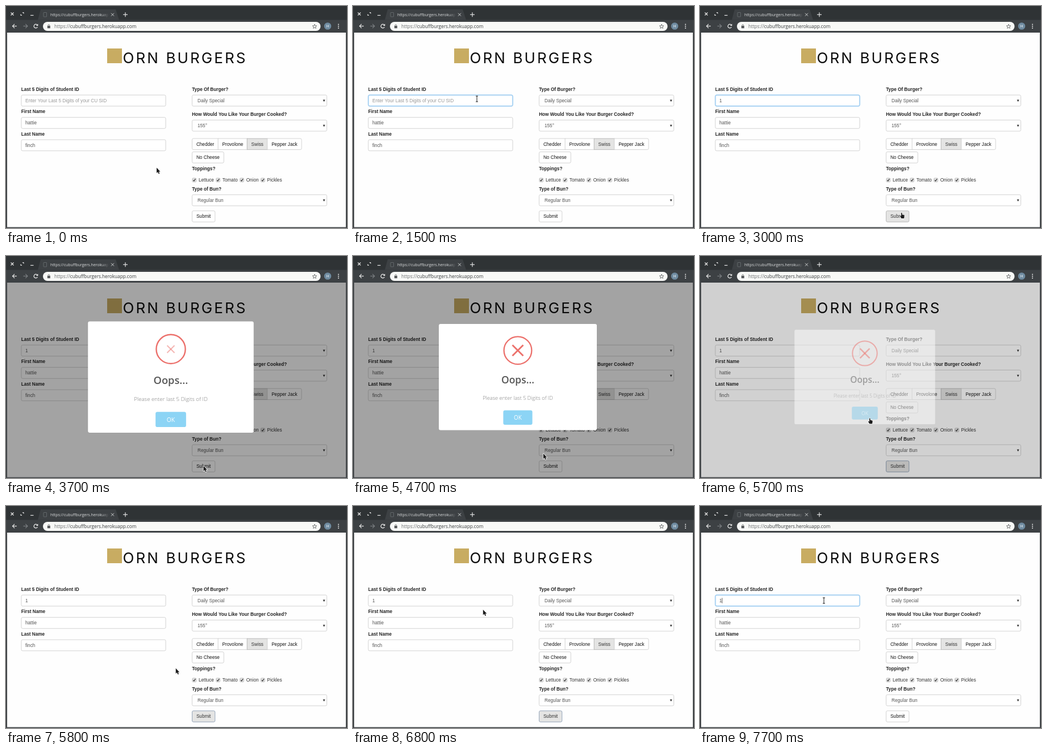
Recreate the animation shown at these times as an HTML page with a canvas. Size 600 px wide and 392 px high, loop 8000 ms.

```html
<!DOCTYPE html>
<html lang="en">
<head>
<meta charset="utf-8">
<title>Burger order form</title>
<style>
html, body { margin: 0; width: 100%; height: 100%; overflow: hidden; background: #fff; }
canvas { display: block; width: 600px; height: 392px; }
</style>
</head>
<body>
<canvas id="stage"></canvas>
<script>
const LOOP = 8000, STEP = 100, W = 600, H = 392;
const SANS = '"Liberation Sans", Arial, sans-serif';
const OPEN = '"Open Sans", "Noto Sans", sans-serif';
const BODY = '8.2px ' + SANS, BOLD = 'bold ' + BODY;
const URL_TEXT = 'https://cubuffburgers.herokuapp.com';
const LEFT = 27, RIGHT = 327.5, TOP = 157.2, ROW = 39.45, BOX_H = 19.6;
const OPENS = 3400, CLOSES = 5500;

const canvas = document.getElementById('stage');
const dpr = window.devicePixelRatio || 1;
canvas.width = W * dpr;
canvas.height = H * dpr;
const c = canvas.getContext('2d');

const ramp = (t, a, b) => Math.min(1, Math.max(0, (t - a) / (b - a)));
const within = (t, a, b) => t >= a && t < b;
const inside = (p, x, y, w, h) => p.x >= x && p.x <= x + w && p.y >= y && p.y <= y + h;
// Damped swing around 1.
const spring = k => 1 - 0.5 * Math.exp(-0.7 * k) * Math.cos(0.83 * k);

function text(str, x, y, font, color, align = 'left') {
  c.font = font;
  c.fillStyle = color;
  c.textAlign = align;
  c.fillText(str, x, y);
  return c.measureText(str).width;
}

function box(x, y, w, h, r, fill, stroke, line = 0.8) {
  c.beginPath();
  c.roundRect(x, y, w, h, r);
  if (fill) { c.fillStyle = fill; c.fill(); }
  if (stroke) { c.strokeStyle = stroke; c.lineWidth = line; c.stroke(); }
}

function line(color, width, ...pts) {
  c.strokeStyle = color;
  c.lineWidth = width;
  c.beginPath();
  for (let i = 0; i < pts.length; i += 2) c.lineTo(pts[i], pts[i + 1]);
  c.stroke();
}

function shape(color, ...pts) {
  c.fillStyle = color;
  c.beginPath();
  for (let i = 0; i < pts.length; i += 2) c.lineTo(pts[i], pts[i + 1]);
  c.fill();
}

function arc(x, y, r, color, width, from = 0, to = 7) {
  c.beginPath();
  c.arc(x, y, r, from, to);
  c.strokeStyle = c.fillStyle = color;
  c.lineWidth = width;
  width ? c.stroke() : c.fill();
}

function cross(x, y, r, color, width) {
  line(color, width, x - r, y - r, x + r, y + r);
  line(color, width, x + r, y - r, x - r, y + r);
}

function arrowIcon(x, dir, color) {
  const y = 35.5, tip = x + 3.7 * dir, back = tip - 3.6 * dir;
  line(color, 1.2, x - 3.7 * dir, y, tip, y);
  line(color, 1.2, back, y - 3.6, tip, y, back, y + 3.6);
}

function drawTabs() {
  const ink = '#e4e4e4';
  c.fillStyle = '#2f3335';
  c.fillRect(0, 0, W, 24.5);
  shape('#3d4144', 56, 24.5, 61, 6, 193, 6, 199, 24.5);

  cross(11, 14, 2.5, ink, 1.2);
  for (const d of [-1, 1]) shape(ink, 28.5 + 3 * d, 14 - 3 * d, 28.5 + 3 * d, 14, 28.5, 14 - 3 * d);
  line(ink, 1.2, 43, 16.5, 48.5, 16.5);
  box(66, 11.5, 5.5, 7.5, 0.5, null, '#6d7174');
  cross(187.5, 15.2, 2.5, '#cfd1d2', 1);
  line(ink, 1.2, 206, 15.2, 214, 15.2);
  line(ink, 1.2, 210, 11.2, 210, 19.2);

  const fade = c.createLinearGradient(168, 0, 181, 0);
  fade.addColorStop(0, '#dadcdd');
  fade.addColorStop(1, '#dadcdd00');
  text(URL_TEXT, 78, 17.8, '6.95px ' + OPEN, fade);
}

function drawToolbar() {
  const ink = '#e8e8e8', dark = '#55585a';
  arrowIcon(15.2, -1, ink);
  arrowIcon(34.2, 1, '#7b7f82');
  arc(52.5, 35.5, 3.3, ink, 1.2, 0.5, 5.6);
  shape(ink, 56.4, 31.5, 56.4, 35, 52.9, 35);

  box(65, 28, 488.5, 16, 8, '#f8f9f7');
  box(72.8, 35, 5, 4.2, 0.3, dark);
  arc(75.3, 34.6, 1.6, dark, 0.9, Math.PI, 0);
  const schemeWidth = text('https://', 85, 38.8, '8.18px ' + OPEN, '#6c6f71');
  text(URL_TEXT.slice(8), 85 + schemeWidth, 38.8, '8.18px ' + OPEN, '#3a3d3f');

  const star = [];
  for (let i = 0; i <= 10; i++) {
    const a = -Math.PI / 2 + i * Math.PI / 5, r = i % 2 ? 1.7 : 4;
    star.push(543 + r * Math.cos(a), 36.2 + r * Math.sin(a));
  }
  line(dark, 0.8, ...star);
  arc(566, 35.5, 6.3, '#6f8ba0');
  text('H', 566, 38.1, '7px ' + OPEN, '#fff', 'center');
  for (let i = -1; i <= 1; i++) arc(585, 35.7 + 3.2 * i, 1, ink);
}

const label = (str, x, boxY) => text(str, x - 0.3, boxY - 7.4, BOLD, '#242424');

function field(row, name, value, color = '#555', glow = 0) {
  const y = TOP + row * ROW;
  label(name, LEFT, y);
  box(LEFT, y, 254, BOX_H, 2.3, '#fff', '#c8c8c8');
  if (glow) {
    c.save();
    c.globalAlpha = glow;
    box(LEFT, y, 254, BOX_H, 3, null, '#d3e9fa', 2.4);
    box(LEFT, y, 254, BOX_H, 2.3, null, '#84bdec');
    c.restore();
  }
  text(value, LEFT + 7, y + 12.7, BODY, color);
}

function select(y, name, value) {
  label(name, RIGHT, y);
  box(RIGHT, y, 237, BOX_H, 2.3, '#fff', '#c8c8c8');
  text(value, RIGHT + 9.5, y + 12.7, BODY, '#555');
  shape('#333', 557.6, y + 8.4, 561.6, y + 8.4, 559.6, y + 12);
}

// Sized by its label; returns the width.
function button(x, y, name, on = false, r = 2.3, edge = '#adadad') {
  c.font = BODY;
  const w = c.measureText(name).width + 14.8;
  box(x, y, w, BOX_H, r, on ? '#e4e4e3' : '#fff', on ? edge : '#c8c8c8');
  text(name, x + w / 2, y + 12.6, BODY, on ? '#333' : '#161616', 'center');
  return w;
}

function drawCheeses() {
  let x = RIGHT;
  const names = ['Chedder', 'Provolone', 'Swiss', 'Pepper Jack'];
  names.forEach((name, i) => {
    const l = i ? 0 : 2.3, r = i < names.length - 1 ? 0 : 2.3;
    x += button(x, 234, name, name === 'Swiss', [l, r, r, l]) - 0.6;
  });
  button(RIGHT, 257.6, 'No Cheese');
}

function drawToppings() {
  let x = 328;
  label('Toppings?', RIGHT, 297.3);
  for (const name of ['Lettuce', 'Tomato', 'Onion', 'Pickles']) {
    box(x, 304, 6.6, 6.6, 1, '#e9e9e9', '#a5a5a5', 0.7);
    line('#333', 1.3, x + 1.4, 307.3, x + 2.8, 309, x + 5.3, 305.3);
    x += 11;
    x += text(name, x, 310.2, BODY, '#333') + 4;
  }
}

function drawCaret(t, typed) {
  if (!within(t, 1000, 3000) && t < 7600) return;
  const since = t >= 7600 ? 7600 : typed ? 1800 : 1000;
  if (Math.floor((t - since) / 500) % 2) return;
  const x = LEFT + (typed ? 11.9 : 7.5);
  line('#333', 0.8, x, 162.3, x, 171.8);
}

function drawPage(t, hover) {
  c.fillStyle = '#fefefe';
  c.fillRect(2, 47, 596, 343.5);

  c.fillStyle = '#c8ac62';
  c.fillRect(178, 75, 26, 26);
  c.letterSpacing = '3.1px';
  text('ORN BURGERS', 205.5, 101, '26px Inter, sans-serif', '#0c0c0c');
  c.letterSpacing = '0px';

  const typed = t >= 1800;
  const glow = ramp(t, 900, 1100) - ramp(t, 3400, 3600) + ramp(t, 7400, 7700);
  field(0, 'Last 5 Digits of Student ID', typed ? '1' : 'Enter Your Last 5 Digits of your CU SID',
    typed ? '#555' : '#999', glow);
  drawCaret(t, typed);
  field(1, 'First Name', 'hattie');
  field(2, 'Last Name', 'finch');

  select(TOP, 'Type Of Burger?', 'Daily Special');
  select(201.4, 'How Would You Like Your Burger Cooked?', '155°');
  drawCheeses();
  drawToppings();
  select(333.2, 'Type of Bun?', 'Regular Bun');

  const focused = within(t, CLOSES, 7500);
  button(RIGHT, 361.7, 'Submit', focused || hover, 2.3, focused ? '#7f93ad' : '#adadad');
}

function drawModal(t, hover) {
  const gone = ramp(t, CLOSES, CLOSES + 400);
  c.save();
  c.fillStyle = '#000';
  c.globalAlpha = 0.36 * ramp(t, OPENS, OPENS + 200) * (1 - gone);
  c.fillRect(2, 47, 596, 343.5);

  const alpha = ramp(t, OPENS, OPENS + 300) * (1 - gone);
  const scale = spring((t - OPENS) / 100) - 0.22 * gone;
  c.globalAlpha = alpha;
  c.translate(290, 213.7);
  c.scale(scale, scale);
  box(-139, -93.7, 278, 187.4, 3, '#fff');
  arc(0, -47, 24.4, '#ec716c', 2.3);
  text('Oops...', 0, 11.4, '600 17.4px ' + OPEN, '#575757', 'center');
  text('Please enter last 5 Digits of ID', 0, 40.6, '300 9.28px ' + OPEN, '#797979', 'center');
  box(-25.6, 58.8, 51.2, 25.5, 3, hover ? '#86cceb' : '#8cd4f5');
  text('OK', 0, 75.2, '9.9px ' + OPEN, '#fff', 'center');

  const mark = ramp(t, OPENS + 100, OPENS + 500);
  c.globalAlpha = alpha * mark;
  cross(0, -47, 9.5 * (0.3 + 0.7 * mark), '#ec716c', 1.2 + 1.7 * mark);
  c.restore();
}

// Each move: start, end, x, y.
const MOVES = [
  [0, 700, 218, 164],
  [2100, 2500, 372, 352],
  [2700, 3300, 347.5, 370.5],
  [4600, 5200, 298.7, 286.5],
  [6200, 7100, 218, 167]
];

function pointer(t) {
  const p = { x: 265, y: 285.5 };
  for (const [start, end, x, y] of MOVES) {
    const k = Math.sin(ramp(t, start, end) * Math.PI / 2);
    p.x += (x - p.x) * k;
    p.y += (y - p.y) * k;
  }
  return p;
}

const POINTERS = {
  arrow: new Path2D('M0 0V9.4L2.1 7.5L3.7 11L5.3 10.3L3.8 7H6.5Z'),
  hand: new Path2D('M-.8 0H.7L1 3.3L4.4 4L5 5L4.4 9.8H-.4L-2.8 6L-2.4 5L-.8 6Z'),
  beam: new Path2D('M-2-5H2M0-5V5M-2 5H2')
};

function drawPointer(p, kind) {
  const beam = kind === 'beam', path = POINTERS[kind];
  c.save();
  c.translate(p.x, p.y);
  c.lineJoin = 'round';
  c.strokeStyle = '#fff';
  c.lineWidth = beam ? 2 : 1.5;
  c.stroke(path);
  c.strokeStyle = c.fillStyle = '#1c1c1c';
  c.lineWidth = 1;
  beam ? c.stroke(path) : c.fill(path);
  c.restore();
}

function draw(t) {
  c.setTransform(dpr, 0, 0, dpr, 0, 0);
  const p = pointer(t), modal = within(t, OPENS + 100, CLOSES + 300);
  const onSubmit = !modal && inside(p, RIGHT, 361, 41, 21);
  const onOk = modal && inside(p, 264, 272, 52, 26);
  const onField = !modal && [0, 1, 2].some(i => inside(p, LEFT, TOP + i * ROW, 254, BOX_H));

  c.fillStyle = '#3d4144';
  c.fillRect(0, 0, W, H);
  drawTabs();
  drawToolbar();
  drawPage(t, onSubmit);
  if (modal) drawModal(t, onOk);
  drawPointer(p, onField ? 'beam' : onSubmit || onOk ? 'hand' : 'arrow');
}

const start = performance.now();
function tick() {
  const t = (performance.now() - start) % LOOP;
  draw(Math.floor(t / STEP) * STEP);
  requestAnimationFrame(tick);
}
tick();
</script>
</body>
</html>
```
